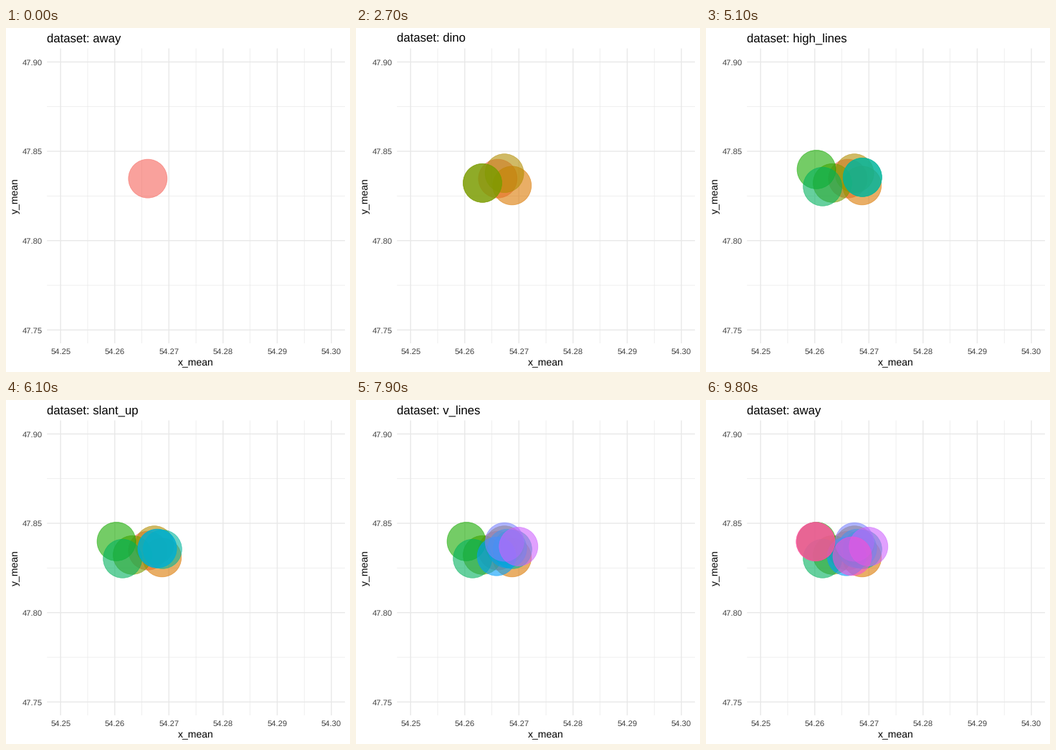
These frames come from a looping animation (480 px wide and 480 px high, 10000 ms). A matplotlib script:

```python
import matplotlib.pyplot as plt
import numpy as np
from matplotlib.animation import FuncAnimation
from matplotlib.patches import Circle

SIZE, DPI = 480, 80
PX = 72 / DPI  # points per pixel
LEFT, RIGHT, TOP, BOTTOM = 57.2, 473, 28.5, 440
GRID = "#e8e8e8"
HOLD = 4

# name, mean x, mean y, colour
GROUPS = [
    ("away", 54.26610, 47.83472, "F8766D"),
    ("bullseye", 54.26873, 47.83082, "E18A00"),
    ("circle", 54.26732, 47.83772, "BE9C00"),
    ("dino", 54.26327, 47.83225, "8CAB00"),
    ("dots", 54.26030, 47.83983, "24B700"),
    ("h_lines", 54.26144, 47.83025, "00BE70"),
    ("high_lines", 54.26881, 47.83545, "00C1AB"),
    ("slant_down", 54.26785, 47.83590, "00BBDA"),
    ("slant_up", 54.26588, 47.83150, "00ACFC"),
    ("star", 54.26734, 47.83955, "8B93FF"),
    ("v_lines", 54.26993, 47.83699, "D575FE"),
    ("wide_lines", 54.26692, 47.83160, "F962DD"),
    ("x_shape", 54.26015, 47.83972, "FF65AC"),
]
# First frame of each group's hold; the last entry wraps to the first group
STARTS = [8 * s - 1 for s in range(11)] + [86, 93, 100]

plt.rcParams.update({"font.family": "Liberation Sans", "text.hinting": "none"})
fig = plt.figure(figsize=(SIZE / DPI, SIZE / DPI), dpi=DPI, facecolor="white")
ax = fig.add_axes([0, 0, 1, 1])
ax.set(xlim=(0, SIZE), ylim=(SIZE, 0))
ax.axis("off")


def x_pos(value):
    return 76.2 + (value - 54.25) * 7556


def y_pos(value):
    return 47.4 + (47.90 - value) * 2493


def line(xs, ys, width):
    ax.plot(xs, ys, color=GRID, lw=width * PX, solid_capstyle="butt", snap=False)


def label(x, y, text, size, **style):
    return ax.text(x, y, text, fontsize=size * PX, va="baseline", **style)


def display_color(code):
    """Darken the mid-tones from gamma 1.8 to gamma 2.2."""
    rgb = np.array([int(code[i:i + 2], 16) for i in (0, 2, 4)]) / 255
    return tuple(rgb ** (2.2 / 1.8))


def add_dot(x, y, code):
    color = display_color(code)
    return ax.add_patch(Circle((x_pos(x), y_pos(y)), 27.02, fc=color, ec=color,
                               lw=0.71 * PX, alpha=0.6, zorder=5))


for offset, width in ((0.5, 0.68), (0, 1.36)):
    for i in range(5 if offset else 6):
        x = x_pos(54.25 + 0.01 * (i + offset))
        line((x, x), (TOP, BOTTOM), width)
    for i in range(3 if offset else 4):
        y = y_pos(47.75 + 0.05 * (i + offset))
        line((LEFT, RIGHT), (y, y), width)

for i in range(6):
    value = 54.25 + 0.01 * i
    label(x_pos(value), 455, f"{value:.2f}", 11.2, ha="center", color="#424242")
for i in range(4):
    value = 47.75 + 0.05 * i
    label(50.8, y_pos(value) + 4.1, f"{value:.2f}", 11.2, ha="right", color="#424242")

label((LEFT + RIGHT) / 2, 471, "x_mean", 14, ha="center")
label(17, (TOP + BOTTOM) / 2, "y_mean", 14, ha="center",
      rotation=90, rotation_mode="anchor")
title = label(LEFT, 19.2, "", 16.8, ha="left")

marks = [add_dot(x, y, code) for _, x, y, code in GROUPS]
leavers = [add_dot(x, y, code) for _, x, y, code in GROUPS]


def update(n):
    current = max(s for s in range(len(GROUPS)) if STARTS[s] <= n)
    leaving = n >= STARTS[current] + HOLD
    for s, (mark, leaver) in enumerate(zip(marks, leavers)):
        mark.set_visible(s <= current)
        leaver.set_visible(leaving and s == current)
    # The title switches two frames before the next dot appears
    named = current + (n >= STARTS[current + 1] - 2)
    title.set_text("dataset: " + GROUPS[named % len(GROUPS)][0])
    return [title, *marks, *leavers]


anim = FuncAnimation(fig, update, frames=100, interval=100, repeat=True,
                     repeat_delay=0)
plt.show()
```
